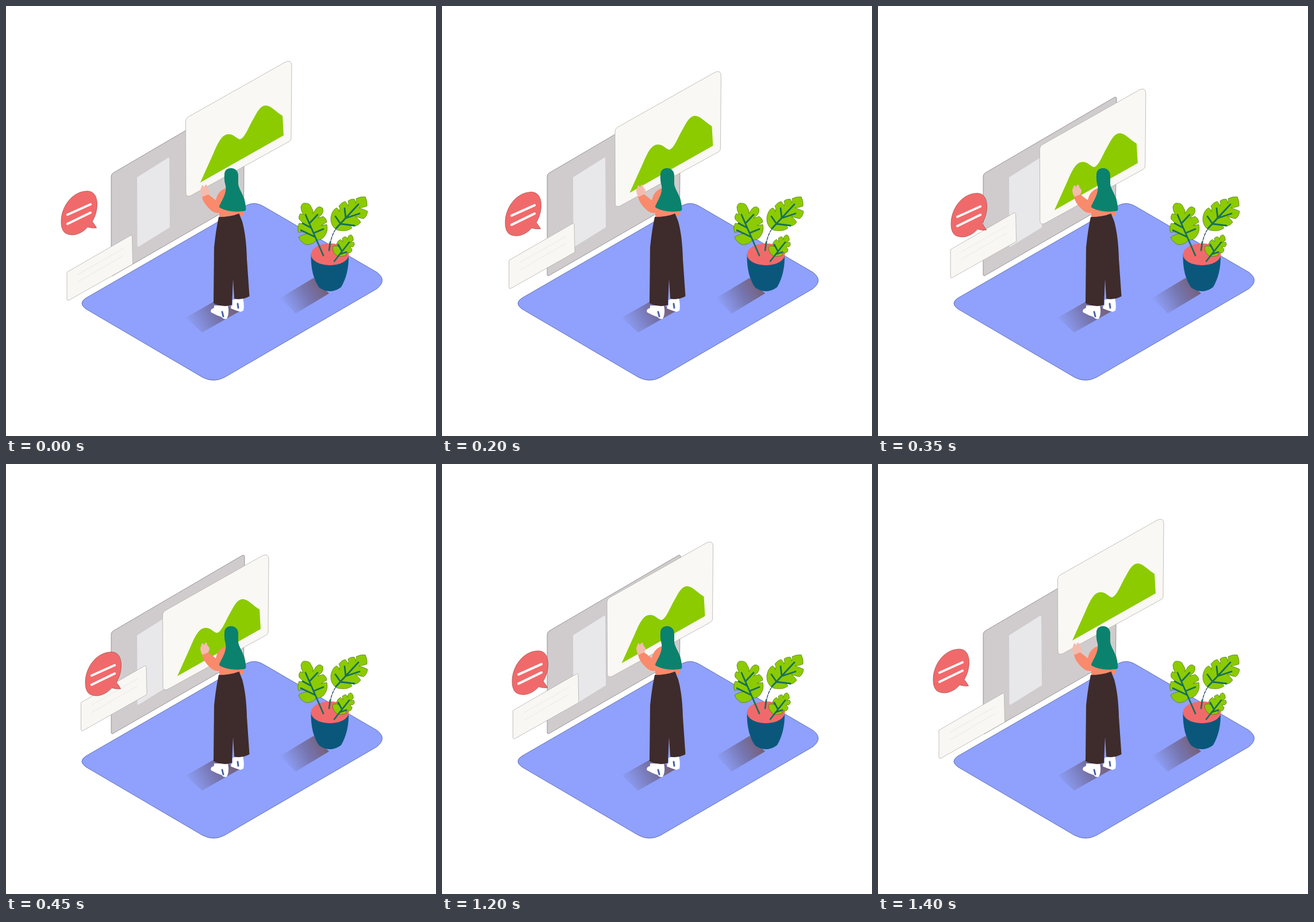
An HTML page that plays this animation: 748x748 px, repeating every 1500 ms.

```html
<!DOCTYPE html>
<html lang="en">
<head>
<meta charset="utf-8">
<title>Isometric workspace</title>
<style>
  html, body { margin: 0; width: 100%; height: 100%; overflow: hidden; background: #fff; }
  svg { display: block; width: 100%; height: 100%; }
  .edge { stroke-width: .7; stroke-linejoin: round; }
  .leaf { fill: #8ccb00; stroke: #4c7010; }
  .line { fill: none; stroke-linecap: round; stroke-linejoin: round; }
  .vein { stroke: #17705a; stroke-width: 2.8; }
  .soft { filter: url(#soft); }
</style>
</head>
<body>
<svg viewBox="0 0 748 748">
  <defs>
    <linearGradient id="womanShade" gradientUnits="userSpaceOnUse" x1="318" y1="560" x2="402" y2="513">
      <stop offset="0" stop-color="#6d6690" stop-opacity="0"/>
      <stop offset=".55" stop-color="#6b638f" stop-opacity=".75"/>
      <stop offset="1" stop-color="#775c70"/>
    </linearGradient>
    <linearGradient id="potShade" gradientUnits="userSpaceOnUse" x1="484" y1="524" x2="556" y2="483">
      <stop offset="0" stop-color="#6d6690" stop-opacity="0"/>
      <stop offset=".55" stop-color="#6b638f" stop-opacity=".7"/>
      <stop offset="1" stop-color="#775c70"/>
    </linearGradient>
    <filter id="soft"><feGaussianBlur stdDeviation=".7"/></filter>
  </defs>

  <path class="edge" fill="#8fa1fc" stroke="#3c4b94" d="M139 508L419 346.500Q433 339.500 448 348.500L645 463Q664 477 645 492L380 646Q361 656 342 646L139 527Q125 517 139 508Z"/>
  <path fill="url(#womanShade)" d="M313 542L362 514L410 529L341 568Z"/>
  <path fill="url(#potShade)" d="M477 508L535 473L562 500L504 535Z"/>

  <path class="edge" fill="#d0cccd" stroke="#777274" d="M183 297Q183 292 187 290L411 159Q415 157 415 162L413.500 338L185 469.500L183 468Z"/>
  <path class="soft" fill="#e8e8eb" d="M228 298L282 264Q284 263 284 266L285 385L230 419L228.500 417Z"/>

  <g id="chart">
    <path class="edge" fill="#f9f8f4" stroke="#aaa6a2" d="M312.500 201Q312.500 196 317 193L486 97.500Q497 92.500 497 104L496 230Q496 234 492 236L321 330Q313 333 313 325Z"/>
    <path class="soft" fill="#8ccb00" d="M338 307L361 256C369 237 376 223 387 223C397 223 401 231 407 232C416 229 421 212 430 197C438 182 443 173 452 173C462 174 468 183 481 191L483 225Z"/>
  </g>

  <g id="card">
    <path class="edge" fill="#f8f7f3" stroke="#aaa6a2" d="M106 463L216 399.500Q219 398 219.500 402L220.500 449L109 512Q106 513 106 510Z"/>
    <path class="line" stroke="#efeff0" stroke-width="1.500" d="M125 467L204 422M125 480L204 434"/>
  </g>

  <g id="bubble">
    <path class="edge" fill="#f16a6b" stroke="#98494a" d="M96 375C96 349 115 323 140 322C156 321 160 337 158 352C157 361 153 370 150 375Q155 381 157.500 386Q150 387 142 384.500C133 395 120 400 110 397.500C100 396 96 388 96 375Z"/>
    <path class="line soft" stroke="#fff" stroke-width="4" d="M107 363L147 345M107 379L147 359.500"/>
  </g>

  <g id="woman" class="soft">
    <path fill="#f98a6c" d="M341 331Q345 330 351 327L365 338Q368 322 382 317L400 320L414 333Q416 338 413 343L413 366L405 365L371 368L371 360Q362 361 355 354Q342 342 341 331Z"/>
    <path fill="#f4bcae" d="M338 320L341 312Q343 311 344 315L347 311Q350 310 350 315L354 320Q354 326 351 328L342 332Q338 327 338 320Z"/>
    <path fill="#0b826d" d="M380 294C379 278 404 278 404 295L404 309C405 321 417 330 417.500 354Q417 357 412 357Q389 360 372 351Q370 349 372 346C376 337 384 326 382 313Q379 303 380 294Z"/>
    <path fill="#fff" d="M362 521L386 521Q389 535 384 544Q379 546 375 541Q366 538 357 533Q354 528 362 525ZM394 511L412 508Q415 520 413 530L408 532Q400 530 391 526Q391 522 394 520Z"/>
    <path class="line" stroke="#4a62a8" stroke-width="3" d="M376 532L378 540M403 518L404 525"/>
    <path fill="#3e2b2c" d="M370 367Q390 367 405.500 361L411 375Q418 400 419 440L423.500 505Q410 512 397 509L395 475L393 520Q378 525 361 517L362 420Q365 390 370 367Z"/>
  </g>

  <g id="plant">
    <path fill="#0b577c" d="M530.500 432Q530 470 545 490Q565 503 583 489Q597 465 596 432Z"/>
    <ellipse cx="563.500" cy="432" rx="33" ry="19" fill="#f16a6b"/>
    <path class="edge leaf" d="M518 343Q529 342 531 350Q535 355 534 361L539 353Q545 346 551 352Q553 358 549 363L542 369L552 366Q558 370 558 376L548 382L558 380Q561 392 553 402Q547 408 540 407Q534 416 521 415Q511 409 509 402Q516 397 525 396Q516 391 509 394Q506 385 510 378L518 379L510 371Q508 366 512 361L517 363Q513 356 513 350Q514 344 518 343Z"/>
    <path class="edge leaf" d="M625 332Q629 340 628 348Q621 351 614 351Q623 354 629 357Q628 366 622 370Q615 369 608 366Q615 372 617 376Q612 383 605 383L597 380L602 386Q596 391 587 391Q577 391 573 388Q564 380 565 368Q567 355 575 351Q580 354 580 358Q582 352 579 348Q584 341 590 340Q594 344 595 348Q597 344 595 339Q600 335 606 336Q609 340 608 343Q611 339 609 335Q617 331 625 332Z"/>
    <path class="edge leaf" d="M600 398Q605 401 604 408L599 411L605 411Q608 416 603 419L598 419L602 423Q602 429 596 430L591 428L592 434Q582 437 575 434Q566 426 569 418Q575 416 579 419L575 414Q577 408 582 406L586 410L585 404Q590 400 592 402L594 406Q594 399 600 398Z"/>
    <path class="line vein" d="M521 363L552 434M538 402L513 390M531 386L516 378M535 395L552 388M528 378L542 363M574 387L613 345M582 379L606 382M591 369L615 361M582 379L573 366M591 369L589 352M571 444L597 411M580 432L592 428M584 426L578 415"/>
    <path class="line" stroke="#173f60" stroke-width="1.300" stroke-dasharray="5 2" d="M573 389Q566 400 564 414"/>
    <path class="line vein" d="M564 411L562 425"/>
  </g>
</svg>
<script>
  const LOOP = 1500, STEP = 50, LAST = 7, INWARD = 150, OUTWARD = 1100;

  // Each part travels by (dx, dy); ease holds its progress at every step.
  const parts = [
    { id: "chart", dx: -40, dy: 62, ease: [0, .13, .29, .47, .637, .78, .895, 1] },
    { id: "card", dx: 24.5, dy: -48, ease: [0, .23, .43, .57, .71, .82, .92, 1] },
    { id: "bubble", dx: 42, dy: 5, ease: [0, .17, .333, .48, .62, .74, .857, 1] }
  ];

  const stepsSince = (time, start) =>
    Math.max(0, Math.min(LAST, Math.floor((time - start) / STEP) + 1));

  function draw(now) {
    const time = now % LOOP;
    const step = stepsSince(time, INWARD) - stepsSince(time, OUTWARD);
    for (const { id, dx, dy, ease } of parts) {
      const p = ease[step];
      document.getElementById(id).setAttribute("transform", `translate(${dx * p} ${dy * p})`);
    }
    requestAnimationFrame(draw);
  }
  draw(performance.now());
</script>
</body>
</html>
```
